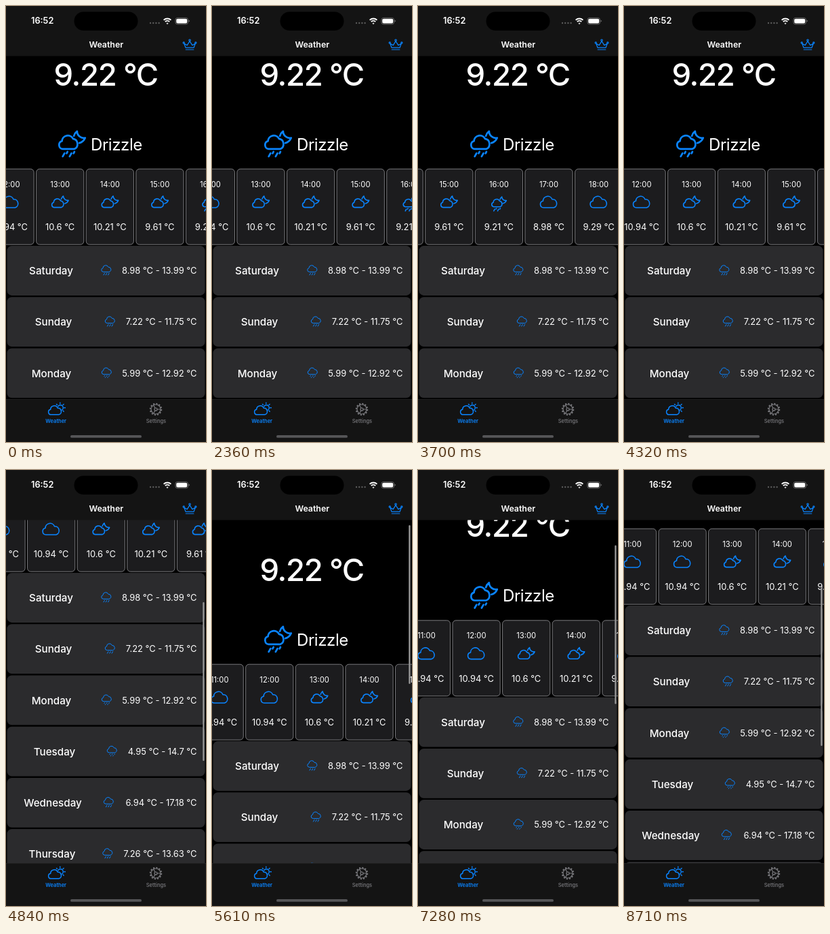
Write an HTML page that moves like this. It is 295 by 640 pixels and loops after 8.76 s.

```html
<!DOCTYPE html>
<html lang="en">
<head>
<meta charset="utf-8">
<title>Weather</title>
<style>
html, body { margin: 0; width: 100%; height: 100%; overflow: hidden; background: #000; }
svg { display: block; width: 295px; height: 640px; font: 12.75px Inter, "Liberation Sans", sans-serif; }
text { fill: #fff; text-anchor: middle; }
.line { fill: none; stroke: #0a84ff; stroke-linecap: round; stroke-linejoin: round; }
.semi { font-weight: 600; }
</style>
</head>
<body>
<svg id="stage" viewBox="0 0 295 640"></svg>
<script>
const HOURS = [
  ['11:00', '10.94', 'cloud'], ['12:00', '10.94', 'cloud'], ['13:00', '10.6', 'moon'],
  ['14:00', '10.21', 'moon'], ['15:00', '9.61', 'moon'], ['16:00', '9.21', 'moonRain'],
  ['17:00', '8.98', 'cloud'], ['18:00', '9.29', 'cloud'], ['19:00', '10.02', 'cloud'],
  ['20:00', '11.02', 'cloud']
];
// name, name centre, icon, icon centre, low, high
const DAYS = [
  ['Saturday', 66.5, 'rain', 148, '8.98', '13.99'],
  ['Sunday', 70, 'rain', 153.5, '7.22', '11.75'],
  ['Monday', 67, 'drizzle', 148.5, '5.99', '12.92'],
  ['Tuesday', 71.5, 'drizzle', 156.5, '4.95', '14.7'],
  ['Wednesday', 69, 'rain', 151.5, '6.94', '17.18'],
  ['Thursday', 68, 'rain', 150, '7.26', '13.63']
];

const cloud = 'M-7.8 8A4.9 4.9 0 0 1-8.6-1.7A7 7 0 0 1 4.9-4.3A6.3 6.3 0 0 1 7.2 8Z';
const smallCloud = 'M-8.8 7.6A3.8 3.8 0 0 1-9.4 .2A5.5 5.5 0 0 1 1-2A5 5 0 0 1 2 7.6Z';
const moon = smallCloud + 'M1.8-4.6A8 8 0 0 1 4.8-9A6.4 6.4 0 0 0 12.4-2.8A8 8 0 0 1 7 2';
const ICONS = {
  cloud,
  moon,
  moonRain: moon + 'M-4.2 10.2l-.8 1.4M-7 11.6l-1.7 3M2.3 10.2l-.8 1.4M-.5 11.6l-1.7 3',
  rain: cloud + 'M-4.4 11.4l-2.6 4.4M1.3 11.4l-2.6 4.4M7 11.4l-2.6 4.4',
  drizzle: cloud + 'M-5.4 11.4l-.8 1.4M.6 11.4l-.8 1.4M6.6 11.4l-.8 1.4M-3 15l-.8 1.4M3 15l-.8 1.4'
};

const icon = (name, x, y, scale, width) =>
  `<path class="line" d="${ICONS[name]}" stroke-width="${width / scale}" transform="translate(${x} ${y}) scale(${scale})"/>`;
const text = (x, y, size, str, extra = '') =>
  `<text x="${x}" y="${y}" font-size="${size}" ${extra}>${str}</text>`;

const hourCard = ([time, temp, kind], i) => {
  const x = 79.7 + (i - 2) * 73.6;
  return `<rect x="${x - 35.1}" y="239.2" width="70.2" height="111" rx="5" fill="#1c1c1e" stroke="#949497" stroke-width=".8"/>` +
    text(x, 265.8, 11.25, time) +
    icon(kind, x, 288, kind === 'moonRain' ? .88 : 1, 1.6) +
    text(x, 329, 12.9, temp + ' °C');
};

const dayCard = ([name, nameX, kind, iconX, low, high], i) => {
  const y = 388.5 + i * 75.2;
  return `<rect x="1.5" y="${y - 36.4}" width="292" height="72.8" rx="7" fill="#2b2b2d"/>` +
    text(nameX, y + 5.6, 15.2, name, 'font-weight="500"') +
    icon(kind, iconX, y - 2.8, .58, 1) +
    text(281.5, y + 4.6, 12.9, `${low} °C - ${high} °C`, 'style="text-anchor:end"');
};

const rays = (cx, cy, from, to, angles) => angles.map(a => {
  const c = Math.cos(a * Math.PI / 180), s = Math.sin(a * Math.PI / 180);
  return `M${cx + from * c} ${cy + from * s}L${cx + to * c} ${cy + to * s}`;
}).join('');

const statusBar = `
  <rect width="295" height="73.5" fill="#141414"/>
  <rect x="100.5" y="8.5" width="94" height="27.5" rx="13.75"/>
  ${text(53.7, 26.4, 12.75, '16:52', 'class="semi"')}
  ${[213, 217.2, 221.4, 225.6].map(x => `<circle cx="${x}" cy="25" r="1.2" fill="#5a5a5a"/>`).join('')}
  <g fill="none" stroke="#fff" stroke-width="1.9">
    <path d="M232.6 20.6A7.8 7.8 0 0 1 243.4 20.6M234.8 23A4.6 4.6 0 0 1 241.2 23"/>
    <path d="M238 26.6l-1-1.2a1.6 1.6 0 0 1 2 0z" stroke-width="1"/>
  </g>
  <rect x="249.9" y="17.4" width="18.6" height="9.4" rx="3" fill="none" stroke="#777" stroke-width=".8"/>
  <rect x="251.2" y="18.7" width="16" height="6.8" rx="1.9" fill="#fff"/>
  <path d="M269.6 20.6v3q1.3-.4 1.3-1.5t-1.3-1.5" fill="#777"/>
  ${text(147.8, 61.4, 12.4, 'Weather', 'class="semi"')}
  <g class="line" stroke-width="1.2">
    <path d="M262.8 55.2L265 61.2H277L279.2 55.2L274.8 57.6L271 51.6L267.2 57.6ZM265.2 64H276.8"/>
    <circle cx="271" cy="50.2" r="1.2"/><circle cx="262.2" cy="54" r="1.1"/><circle cx="279.8" cy="54" r="1.1"/>
  </g>`;

const tabBar = `
  <rect y="577" width="295" height="63" fill="#141414"/>
  <rect y="577" width="295" height=".5" fill="#2a2a2a"/>
  ${icon('cloud', 72.4, 593.6, .78, 1.5)}
  <path class="line" stroke-width="1.4" d="M76.8 587.8A4 4 0 1 1 82.6 593${rays(79.8, 589.8, 6, 7.6, [-135, -90, -45, 0, 45])}"/>
  ${text(73.7, 611.6, 7.5, 'Weather', 'class="semi" style="fill:#0a84ff"')}
  <g fill="none" stroke="#7c7c80" stroke-width="1.2">
    <circle cx="221" cy="592" r="7"/><circle cx="221" cy="592" r="2"/>
    <circle cx="221" cy="592" r="8.3" stroke-width="1.8" stroke-dasharray="2.2 2.146"/>
    <path d="${rays(221, 592, 2, 7, [0, 120, 240])}"/>
  </g>
  ${text(221.4, 611.6, 7.5, 'Settings', 'font-weight="500" style="fill:#7c7c80"')}
  <rect x="95" y="630" width="105" height="3.8" rx="1.9" fill="#565658"/>`;

const stage = document.getElementById('stage');
stage.innerHTML = `
  <rect width="295" height="640"/>
  <g id="page">
    ${text(147.2, 116.6, 45.5, '9.22 °C', 'font-weight="500" letter-spacing="-1.4"')}
    ${icon('moonRain', 97.3, 198, 1.57, 2.7)}
    ${text(125, 211.8, 24, 'Drizzle', 'letter-spacing="-.4" style="text-anchor:start"')}
    <g id="hours">${HOURS.map(hourCard).join('')}</g>
    ${DAYS.map(dayCard).join('')}
  </g>
  <rect id="bar" x="290.2" y="81" width="2.4" height="233" rx="1.2" fill="#959595"/>
  ${statusBar}${tabBar}`;

const LOOP = 8760, TOP = -46;
// The screen refreshes only at these moments: first, last, count
const ticks = [
  [0, 0, 1], [2360, 3010, 7], [3370, 3930, 6], [4120, 4320, 3], [4420, 4840, 5], [4960, 5060, 2],
  [5300, 5610, 4], [5710, 6160, 5], [6270, 6620, 2], [7110, 7110, 1], [7280, 7490, 3], [7710, 7710, 1]
].flatMap(([a, b, n]) => Array.from({ length: n }, (_, i) => a + (n > 1 ? (b - a) * i / (n - 1) : 0)));

const ease = (t, a, b, from, to) => {
  const x = Math.min(1, Math.max(0, (t - a) / (b - a)));
  return from + (to - from) * x * x * (3 - 2 * x);
};
const scrollX = t =>
  t < 3280 ? ease(t, 2290, 3010, 0, 289.6) :
  t < 4100 ? ease(t, 3290, 3930, 289.6, 55) :
  Math.max(-80, -84 + 64 * Math.exp((4320 - t) / 518));
const scrollY = t =>
  t < 5200 ? ease(t, 4330, 4840, 0, 201) :
  t < 7000 ? ease(t, 5210, 5610, 201, TOP) :
  ease(t, 7050, 7655, TOP, 153);
const barAlpha = t => t < 4400 ? 0 : t < 6270 ? 1 : t < 6620 ? .4 : t < 7110 ? 0 : 1;

const [page, hours, bar] = ['page', 'hours', 'bar'].map(id => document.getElementById(id));
const start = performance.now();
function draw() {
  const now = (performance.now() - start) % LOOP;
  const t = ticks.findLast(tick => tick <= now + .5);
  const y = scrollY(t);
  page.setAttribute('transform', `translate(0 ${-y})`);
  hours.setAttribute('transform', `translate(${-scrollX(t)} 0)`);
  bar.setAttribute('transform', `translate(0 ${(y - TOP) * .457})`);
  bar.setAttribute('opacity', barAlpha(t));
  requestAnimationFrame(draw);
}
draw();
</script>
</body>
</html>
```
